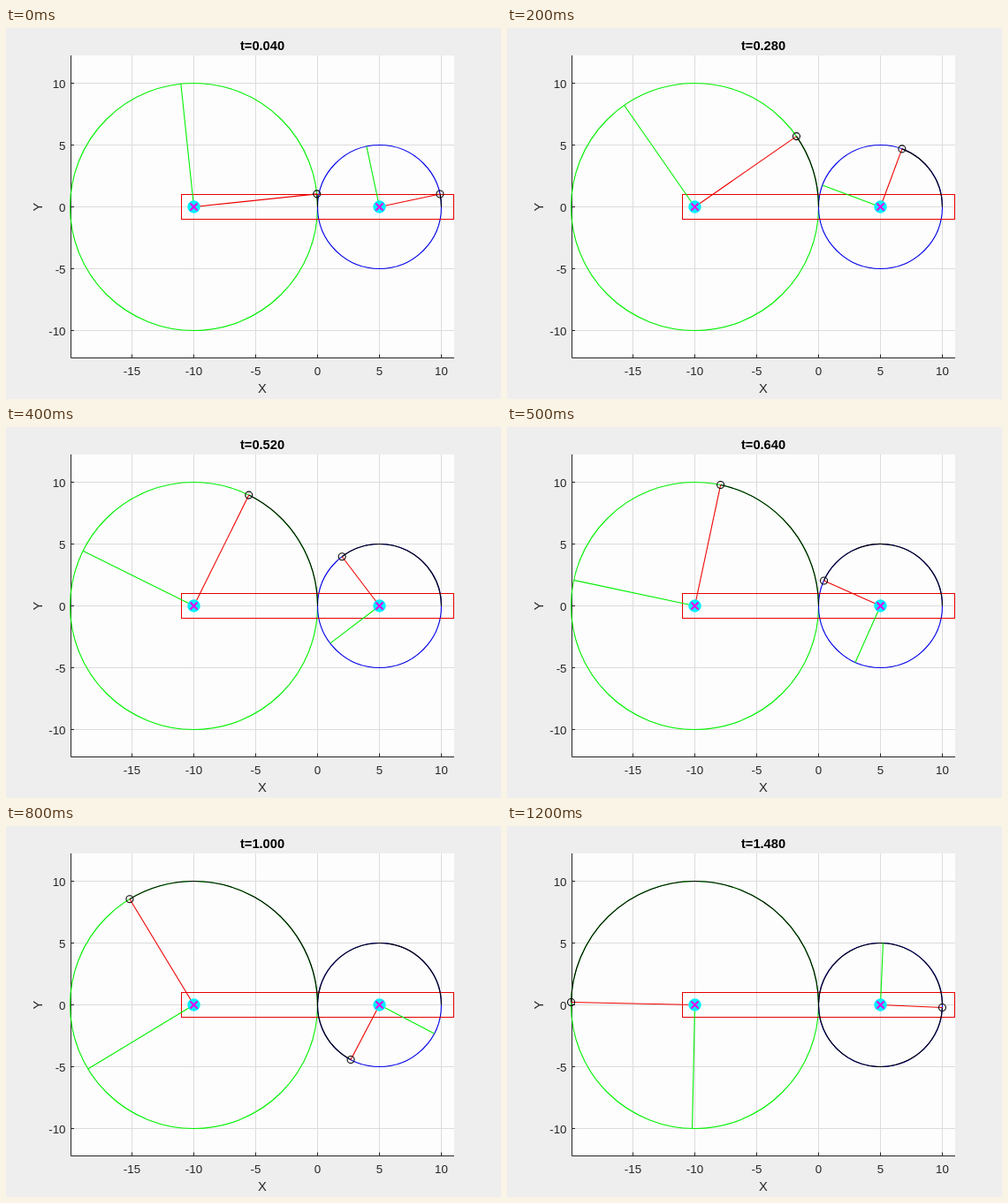
These frames come from a looping animation (560x420 px, 1300 ms). An HTML page:

```html
<!DOCTYPE html>
<html lang="en">
<head>
<meta charset="utf-8">
<title>Rolling gears</title>
<style>
  html, body { margin: 0; width: 100%; height: 100%; overflow: hidden; background: #eee; }
  svg { display: block; width: 560px; height: 420px; }
  text { font: 13.33px "Liberation Sans", Arial, sans-serif; fill: #262626; }
  .label { font-size: 14.67px; text-anchor: middle; }
  .title { font-weight: bold; fill: #000; }
  path, circle, rect { fill: none; }
</style>
</head>
<body>
<svg id="plot" viewBox="0 0 560 420"></svg>
<script>
const FRAME_MS = 100, FRAMES = 13;
const SCALE = 14, X0 = 352.5, Y0 = 202.5;
const LEFT = 73, RIGHT = 507, TOP = 31, BOTTOM = 373.5;
const svg = document.getElementById("plot");
const px = x => X0 + x * SCALE;
const py = y => Y0 - y * SCALE;

function add(tag, attrs, text) {
  const el = document.createElementNS("http://www.w3.org/2000/svg", tag);
  for (const key in attrs) el.setAttribute(key, attrs[key]);
  if (text !== undefined) el.textContent = text;
  svg.append(el);
  return el;
}
const line = (stroke, d = "", width = 1.1) => add("path", { d, stroke, "stroke-width": width });

// Axes, grid and labels
add("rect", { x: LEFT, y: TOP, width: RIGHT - LEFT, height: BOTTOM - TOP, style: "fill:#fdfdfd" });
for (let v = -15; v <= 10; v += 5) {
  const x = px(v), y = py(v);
  line("#dcdcdc", `M${x} ${TOP}V${BOTTOM}`, 1);
  line("#262626", `M${x} ${BOTTOM}v-4`, 1);
  add("text", { x, y: 393, "text-anchor": "middle" }, v);
  if (v < -10) continue;
  line("#dcdcdc", `M${LEFT} ${y}H${RIGHT}`, 1);
  line("#262626", `M${LEFT} ${y}h4`, 1);
  add("text", { x: 67.5, y: y + 5, "text-anchor": "end" }, v);
}
line("#262626", `M73.5 ${TOP}V${BOTTOM}H${RIGHT}`, 1);
add("text", { x: 290, y: 413, class: "label" }, "X");
add("text", { x: 0, y: 0, class: "label", transform: "translate(41 202.5) rotate(-90)" }, "Y");
const title = add("text", { x: 290, y: 25, class: "label title" });

// Gears: centre, radius and turning ratio
const gears = [
  { cx: px(-10), r: 10 * SCALE, ratio: 1, color: "#00f000" },
  { cx: px(5), r: 5 * SCALE, ratio: 2, color: "#0000e8" }
];
for (const g of gears)
  add("circle", { cx: g.cx, cy: Y0, r: g.r, stroke: g.color, "stroke-width": 1.1 });
add("rect", { x: px(-11), y: py(1), width: 22 * SCALE, height: 2 * SCALE, stroke: "#e60000" });
for (const g of gears) {
  g.trace = line("#000");
  g.spoke = line("#00f000");
  g.crank = line("#f00000");
  add("circle", { cx: g.cx, cy: Y0, r: 7.2, style: "fill:#00f0ff" });
  line("#e800e8", `M${g.cx - 4} ${Y0 - 4}l8 8m0-8l-8 8`, 2);
  g.pin = add("circle", { r: 4, stroke: "#000", "stroke-width": 1.1 });
}

function point(g, angle) {
  return [g.cx + g.r * Math.cos(angle), Y0 - g.r * Math.sin(angle)];
}

function draw(step) {
  const t = 0.04 + 0.12 * step;
  title.textContent = "t=" + t.toFixed(3);
  for (const g of gears) {
    const angle = g.ratio * (t + 0.01) * 2 * Math.PI / 3;
    const [x, y] = point(g, angle);
    const hub = `M${g.cx} ${Y0}L`;
    g.crank.setAttribute("d", hub + `${x} ${y}`);
    g.spoke.setAttribute("d", hub + point(g, angle + Math.PI / 2).join(" "));
    g.trace.setAttribute("d",
      `M${g.cx + g.r} ${Y0}A${g.r} ${g.r} 0 ${angle > Math.PI ? 1 : 0} 0 ${x} ${y}`);
    g.pin.setAttribute("cx", x);
    g.pin.setAttribute("cy", y);
  }
}

const start = performance.now();
function tick() {
  draw(Math.floor((performance.now() - start) / FRAME_MS) % FRAMES);
  requestAnimationFrame(tick);
}
tick();
</script>
</body>
</html>
```
